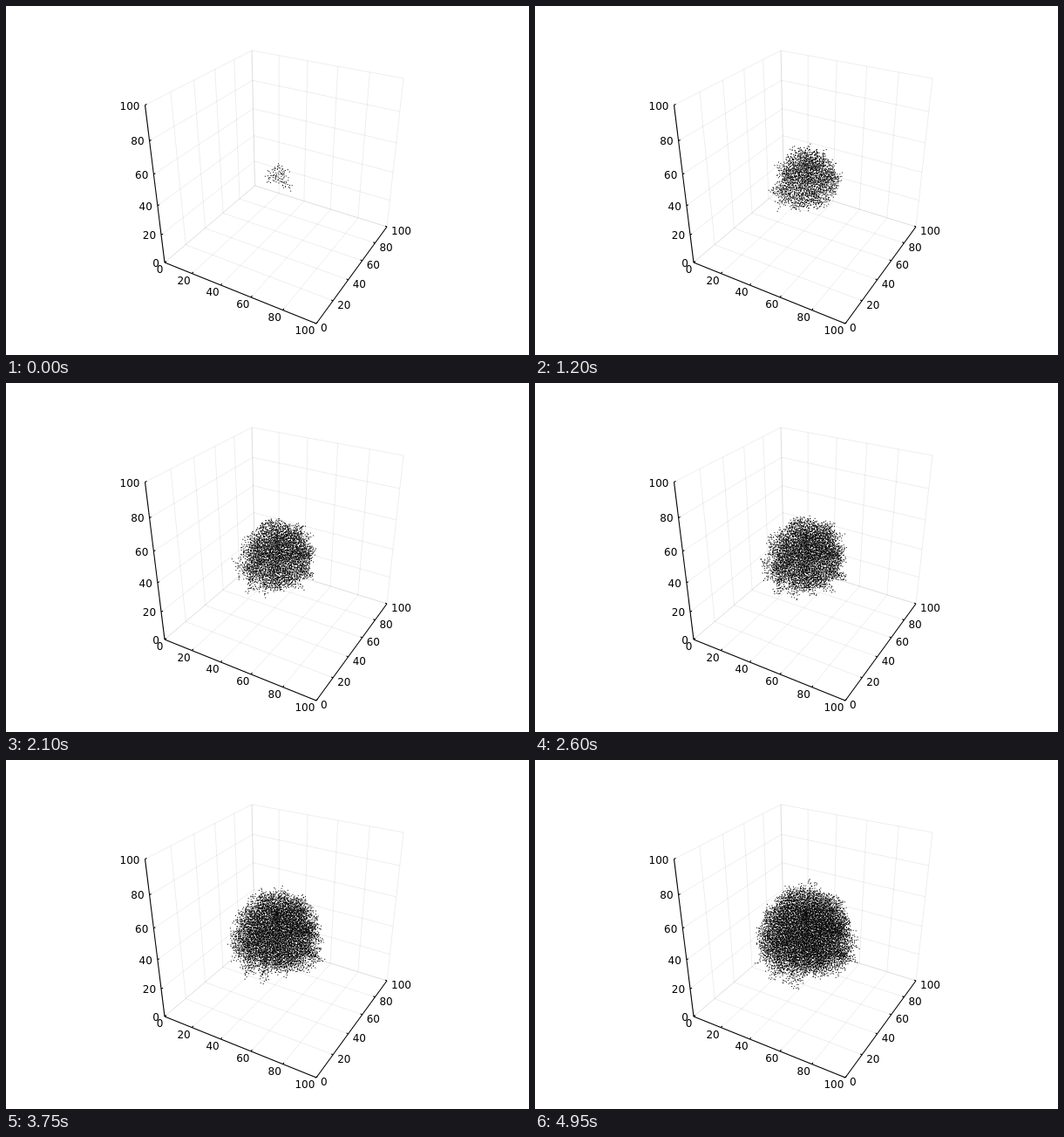
Animation of 600 by 400 pixels, one loop 5000 ms. Source, as an HTML page with a canvas:

```html
<!DOCTYPE html>
<html lang="en">
<head>
<meta charset="utf-8">
<title>Growing cluster</title>
<style>
  html, body { margin: 0; width: 100%; height: 100%; overflow: hidden; background: #fff; }
  canvas { display: block; }
</style>
</head>
<body>
<canvas id="stage" width="600" height="400"></canvas>
<script>
const ctx = document.getElementById('stage').getContext('2d');
const STEP_MS = 50, STEPS = 100, PER_STEP = 100;
const TICKS = [0, 0.2, 0.4, 0.6, 0.8, 1];

// Corners of the plot box on screen, named by their x, y, z position.
const C = {
  o: [182, 294], x: [356, 364], y: [285.5, 206], z: [159.5, 113.5],
  xy: [437, 253], yz: [282, 51], xyz: [456, 83]
};

// Perspective map of the unit square onto the quad a, b, c, d (u runs a-b, v runs a-d).
function quad(a, b, c, d) {
  const sx = a[0] - b[0] + c[0] - d[0], sy = a[1] - b[1] + c[1] - d[1];
  const dx1 = b[0] - c[0], dx2 = d[0] - c[0], dy1 = b[1] - c[1], dy2 = d[1] - c[1];
  const det = dx1 * dy2 - dx2 * dy1;
  const g = (sx * dy2 - dx2 * sy) / det, h = (dx1 * sy - sx * dy1) / det;
  return (u, v) => [0, 1].map(i =>
    (a[i] + u * (b[i] * (1 + g) - a[i]) + v * (d[i] * (1 + h) - a[i])) / (1 + g * u + h * v));
}

const floor = quad(C.o, C.x, C.xy, C.y);
const leftWall = quad(C.o, C.y, C.yz, C.z);
const backWall = quad(C.y, C.xy, C.xyz, C.yz);

// Homogeneous weights of the three axis ends give the camera for the dots.
const AXES = [[C.x, 0.8823], [C.y, 1.2114], [C.z, 0.853]];
function project(p) {
  let [x, y] = C.o, w = 1;
  AXES.forEach(([end, weight], i) => {
    x += p[i] * (end[0] * weight - C.o[0]);
    y += p[i] * (end[1] * weight - C.o[1]);
    w += p[i] * (weight - 1);
  });
  return [x / w, y / w];
}

function seeded(seed) {
  return () => {
    seed = (seed + 0x6D2B79F5) | 0;
    let t = Math.imul(seed ^ (seed >>> 15), 1 | seed);
    t = (t + Math.imul(t ^ (t >>> 7), 61 | t)) ^ t;
    return ((t ^ (t >>> 14)) >>> 0) / 4294967296;
  };
}

// Each new ball touches a random earlier one and overlaps none.
function growCluster(count) {
  const random = seeded(17), size = 80, bins = new Map(), balls = [], active = [];
  const key = (i, j, k) => (i * size + j) * size + k;
  const bin = v => Math.floor(v) + size / 2;
  const isFree = p => {
    const [i, j, k] = p.map(bin);
    for (let a = i - 1; a <= i + 1; a++)
      for (let b = j - 1; b <= j + 1; b++)
        for (let c = k - 1; c <= k + 1; c++)
          for (const q of bins.get(key(a, b, c)) || [])
            if ((p[0] - q[0]) ** 2 + (p[1] - q[1]) ** 2 + (p[2] - q[2]) ** 2 < 0.9999) return false;
    return true;
  };
  const add = p => {
    const id = key(...p.map(bin));
    if (!bins.has(id)) bins.set(id, []);
    bins.get(id).push(p);
    balls.push(p);
    active.push({ p, misses: 0 });
  };
  add([0, 0, 0]);
  while (balls.length < count) {
    const at = Math.floor(random() * active.length), parent = active[at];
    const z = 2 * random() - 1, turn = 2 * Math.PI * random(), r = Math.sqrt(1 - z * z);
    const p = [r * Math.cos(turn), r * Math.sin(turn), z].map((d, i) => parent.p[i] + d);
    if (isFree(p)) add(p);
    else if (++parent.misses > 60) {
      active[at] = active[active.length - 1];
      active.pop();
    }
  }
  return balls;
}

const balls = growCluster(STEPS * PER_STEP);
const rms = Math.sqrt(balls.reduce((s, p) => s + p[0] ** 2 + p[1] ** 2 + p[2] ** 2, 0) / balls.length);
const scale = 0.27 * Math.sqrt(0.6) / rms;
const dots = balls.map(p => project(p.map(v => 0.5 + v * scale)));

function line(a, b) {
  ctx.beginPath();
  ctx.moveTo(...a);
  ctx.lineTo(...b);
  ctx.stroke();
}

function drawGrid() {
  ctx.strokeStyle = 'rgba(0,0,0,0.1)';
  ctx.lineWidth = 0.7;
  for (const face of [floor, leftWall, backWall])
    for (const t of TICKS) {
      line(face(t, 0), face(t, 1));
      line(face(0, t), face(1, t));
    }
}

function drawAxis(at, inward, align, dx, dy) {
  line(at(0), at(1));
  ctx.textAlign = align;
  for (const t of TICKS) {
    const [x, y] = at(t);
    line([x, y], [x + inward[0], y + inward[1]]);
    ctx.fillText(Math.round(t * 100), x + dx, y + dy);
  }
}

function drawAxes() {
  ctx.strokeStyle = ctx.fillStyle = '#000';
  ctx.lineWidth = 1.1;
  ctx.font = '12px "DejaVu Sans", sans-serif';
  ctx.textBaseline = 'alphabetic';
  drawAxis(t => floor(t, 0), [1.3, -1.7], 'right', -1.7, 12);
  drawAxis(t => floor(1, t), [-2, -0.8], 'left', 5, 9.4);
  drawAxis(t => leftWall(0, t), [2, -1], 'right', -6, 5);
}

function draw(step) {
  ctx.fillStyle = '#fff';
  ctx.fillRect(0, 0, 600, 400);
  drawGrid();
  drawAxes();
  ctx.fillStyle = '#000';
  const count = (step + 1) * PER_STEP;
  for (let i = 0; i < count; i++) ctx.fillRect(dots[i][0] - 0.5, dots[i][1] - 0.5, 1, 1);
}

let shown = -1;
const start = performance.now();
function tick() {
  const step = Math.floor((performance.now() - start) / STEP_MS) % STEPS;
  if (step !== shown) draw(shown = step);
  requestAnimationFrame(tick);
}
tick();
</script>
</body>
</html>
```
